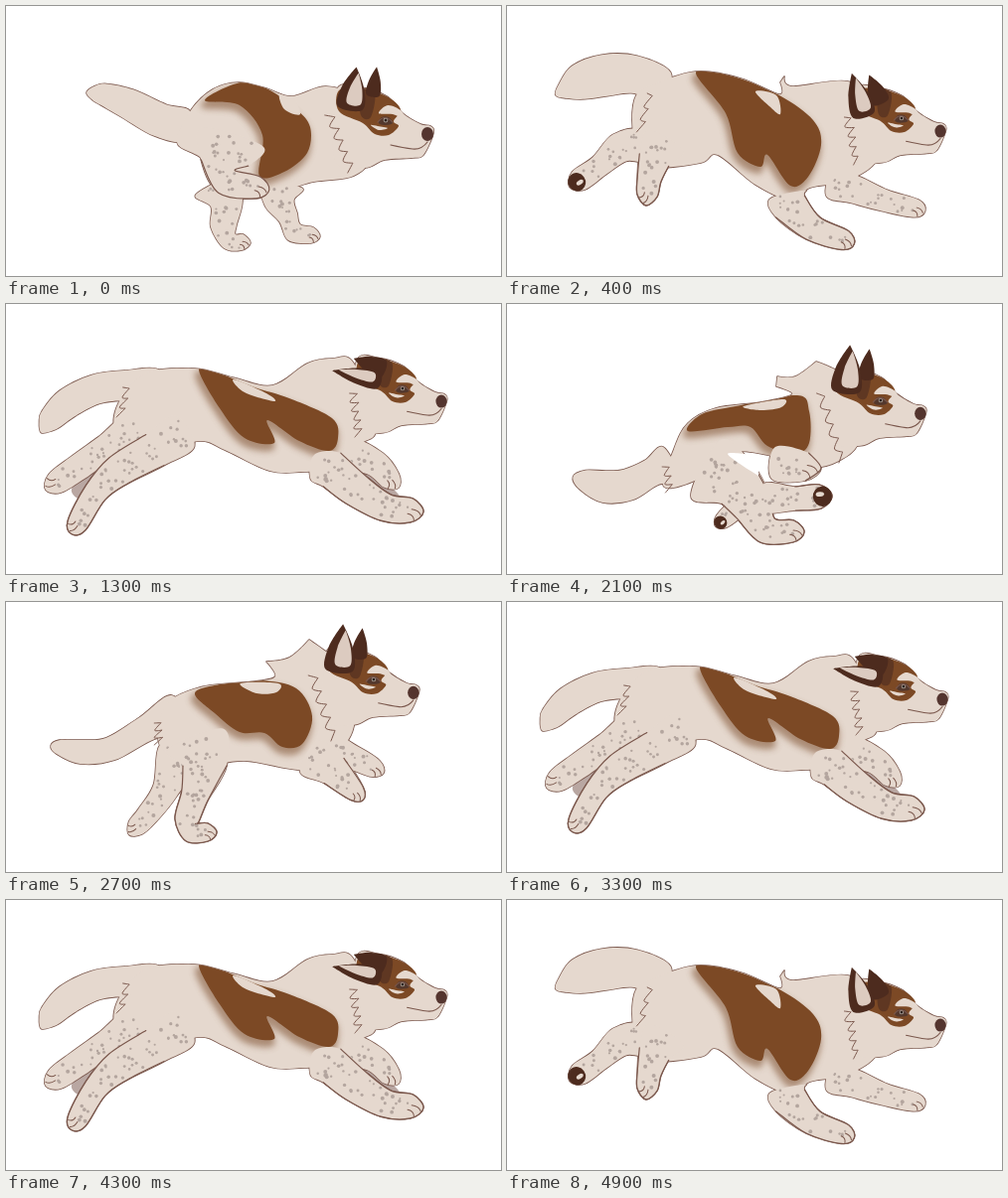
Recreate the animation shown at these times as an HTML page. Size 498 by 272 pixels, loop 5000 ms.

```html
<!DOCTYPE html>
<html lang="en">
<head>
<meta charset="utf-8">
<title>Running dog</title>
<style>
html, body { margin: 0; width: 100%; height: 100%; overflow: hidden; background: #fff; }
svg { display: block; width: 100vw; height: 100vh; }
path { stroke-linecap: round; stroke-linejoin: round; }
</style>
</head>
<body>
<svg id="stage" viewBox="0 0 498 272">
  <filter id="blur" x="-20%" y="-20%" width="140%" height="140%"><feGaussianBlur stdDeviation="3"/></filter>
</svg>
<script>
const COAT = '#e5d8ce', INK = '#7a574c', BROWN = '#7c4925', DARK = '#4d2b1e';

// "x,y x,y!" becomes a list of points; "!" makes a corner.
const parse = text => text.split(' ').map(s =>
  Object.assign(s.replace('!', '').split(',').map(Number), { sharp: s.endsWith('!') }));

// Smooth curve through all points.
function curve(pts, closed = true) {
  const n = pts.length;
  const at = i => closed ? pts[(i + n) % n] : pts[Math.max(0, Math.min(n - 1, i))];
  const handle = (i, dir) => [0, 1].map(k => at(i)[k] + (at(i).sharp ? 0 : dir * (at(i + 1)[k] - at(i - 1)[k]) / 6));
  let d = 'M' + pts[0];
  for (let i = 0; i < n - !closed; i++) d += `C${handle(i, 1)} ${handle(i + 1, -1)} ${at(i + 1).slice(0, 2)}`;
  return d + (closed ? 'Z' : '');
}

const fill = (d, color, extra = '') => `<path d="${d}" fill="${color}" ${extra}/>`;
const blob = (text, color) => text ? fill(curve(parse(text)), color) : '';
const line = (d, width = 1.2) => fill(d, 'none', `stroke="${INK}" stroke-width="${width}"`);
const place = ([x, y], angle, sx, sy, inner) =>
  `<g transform="translate(${x} ${y}) rotate(${angle}) scale(${sx} ${sy})">${inner}</g>`;

let seed = 0;
const random = () => { const v = Math.sin(++seed * 12.9898) * 43758.5453; return v - Math.floor(v); };

// A tapered limb through joints "x,y,radius"; a trailing "!" gives it a dark pad.
function limb(text) {
  const joints = parse(text), end = joints.length - 1, left = [], right = [];
  let angle;
  joints.forEach(([x, y, r], i) => {
    const a = joints[Math.max(0, i - 1)], b = joints[Math.min(end, i + 1)];
    angle = Math.atan2(b[1] - a[1], b[0] - a[0]);
    const dx = r * Math.sin(angle), dy = -r * Math.cos(angle);
    left.push([x + dx, y + dy]);
    right.unshift([x - dx, y - dy]);
  });
  const paw = joints[end], r = paw[2];
  const tip = [paw[0] + r * Math.cos(angle), paw[1] + r * Math.sin(angle)];
  return {
    joints, paw, angle: angle * 180 / Math.PI,
    outline: curve([...left, tip, ...right]),
    edge: curve([...left.slice(1), tip, ...right.slice(0, -1)], false)
  };
}

function speckles({ joints }) {
  let out = '';
  for (let i = 1; i < joints.length; i++) {
    const a = joints[i - 1], b = joints[i];
    const dx = b[0] - a[0], dy = b[1] - a[1], len = Math.hypot(dx, dy);
    for (let n = len * (a[2] + b[2]) / 100; n > 0; n--) {
      const t = random(), side = (random() - .5) * 1.5 * (a[2] + (b[2] - a[2]) * t) / len;
      out += `<circle cx="${a[0] + dx * t - dy * side}" cy="${a[1] + dy * t + dx * side}" r="${1 + random()}"/>`;
    }
  }
  return `<g fill="#b3a59e">${out}</g>`;
}

function pawMarks({ paw, angle }) {
  const r = paw[2];
  return paw.sharp
    ? place(paw, angle, r, r, `<ellipse cx=".2" rx=".8" ry=".85" fill="${DARK}"/><ellipse cx="0" cy="-.2" rx=".35" ry=".2" fill="${COAT}"/>`)
    : place(paw, angle, 1, 1, line(`M0 ${-r * .1}q${r * .6} 0 ${r * .8} ${r * .4}M${-r * .3} ${r * .3}q${r * .5} 0 ${r * .6} ${r * .5}`, 1));
}

// Ragged fur between two points.
function fur(text, n = 5) {
  const [[x1, y1], [x2, y2]] = parse(text), pts = [];
  for (let i = 0; i <= 2 * n; i++) {
    const t = i / (2 * n), out = (i % 2 ? 4 : -3) + random() * 2;
    pts.push(Object.assign([x1 + (x2 - x1) * t + out, y1 + (y2 - y1) * t + (i % 2 ? -2 : 2)], { sharp: i % 2 }));
  }
  return line(curve(pts, false), 1);
}

// The head, drawn around the eye.
const HEAD = curve(parse('-49,-30 -25,-34 2,-25 18,-8 36,3 46,5 49,12 39,34 28,37 0,39 -20,47 -50,40'));
const FACE =
  blob('-46,-31 -24,-33 2,-25 16,-12 9,0 14,5 4,14 -10,13 -22,2 -46,-10', BROWN) +
  blob('-24,-31 -10,-28 -14,-4 -24,-6', '#5f3722') +
  blob('-6,-8 3,-16 16,-11 19,-3 8,-7', COAT) +
  blob('-14,4 -7,5 3,7 -6,9', COAT) +
  blob('-6,2 -3,-4 4,-4 8,2 0,4', '#53382d') +
  '<circle r="2.4" cx="1" cy="-1" fill="#a9a098"/><circle r="1.5" cx="1" cy="-1" fill="#2e1f1a"/>' +
  line('M-7 1Q0-8 8 1M43 21Q37 29 28 28T6 24') +
  '<ellipse cx="43" cy="13" rx="6" ry="7" fill="#54352f"/>';

// Ear: base point, tilt, width, length.
const EAR = curve(parse('-.5,0 -.45,-.5 0,-1! .45,-.5 .5,0'));
const ear = ([x, y, tilt, w, h], open) => place([x, y], tilt, w, h, fill(EAR, DARK) +
  (open ? `<g transform="translate(.12 -.12) scale(.55 .75)">${fill(EAR, '#dccbc0')}</g>` : ''));

// Joints and outlines of the stride, one entry per pose.
const poses = [
  {
    eye: '381,116,1', ears: ['369,90,8,13,29', '346,103,9,25,42'],
    tail: '182,121,15 155,115,17 122,98,15 98,89,11 88,88,7',
    torso: '186,105 208,84 234,77 262,83 287,91 322,81 350,95 365,150 350,171 310,177 270,186 225,175 195,152 172,137',
    far: ['278,180,20 275,198,15 284,213,10 290,228,10 308,231,8', '213,180,24 222,200,16 219,222,13 225,237,9 238,238,8'],
    near: ['228,132,32 220,158,24 222,177,14 254,183,11'],
    saddle: '200,95 236,77 264,84 292,104 306,122 303,148 280,167 255,171 258,130 235,100',
    streak: '275,88 288,90 296,109 280,104', ruff: '323,108 346,166'
  },
  {
    eye: '375,98,.95', ears: ['361,75,7,14,30', '341,88,5,27,47'],
    tail: '165,160,18 145,170,14 122,182,16 98,184,16 76,177,10',
    torso: '168,146 182,120 210,105 255,99 287,91 271,83! 272,73! 290,73 311,58! 330,66 350,80 355,135 334,158 300,165 262,152 222,150 195,175 158,184',
    far: ['232,205,8 216,219,8!'],
    near: ['200,165,32 232,182,25 248,205,20 262,228,14 288,229,11', '258,195,14 290,196,12 315,194,12!', '268,160,16 302,164,14'],
    saddle: '182,128 196,111 230,103 292,92 304,108 304,140 290,151 262,143 245,124 222,124',
    streak: '238,103 278,96 276,104 255,107', ruff: '313,88 335,158', rump: '158,162 162,188',
    gap: '222,151 253,153! 253,173!'
  },
  {
    eye: '369,79,.95', ears: ['355,56,7,14,30', '335,69,5,27,47'],
    tail: '175,110,18 140,128,13 105,148,12 75,151,12 52,146,7',
    torso: '160,105 195,86 250,80 271,75 262,60! 285,56 305,38! 322,50 350,70 350,125 332,152 300,169 240,160 190,165 155,145',
    far: ['175,150,20 160,190,13 142,215,11 130,228,9', '320,145,14 350,157,12 372,168,9'],
    near: ['190,138,30 200,165,22 190,195,14 182,220,12 186,232,10 203,232,9', '305,155,18 330,170,16 353,193,9'],
    saddle: '190,92 215,83 255,79 292,87 308,115 298,143 278,146 260,132 235,131 210,112',
    streak: '236,82 274,82 272,91 252,92', ruff: '306,72 328,138', rump: '152,120 152,142'
  },
  {
    eye: '398,86,.93', ears: ['380,66,-70,18,32', '375,77,-78,17,48'],
    tail: '155,82,15 120,82,15 90,86,15 62,100,15 45,116,12 40,123,8',
    torso: '140,70 190,65 228,74 268,82 303,60 328,55 350,60 372,125 356,142 345,165 300,169 265,168 220,147 195,138 150,148 112,130 113,100',
    far: ['135,130,22 100,146,14 72,165,13 49,181,11', '345,150,14 372,161,13 388,178,10'],
    near: ['180,128,18 150,147,18 113,168,16 90,190,12 71,223,10', '308,164,12 328,167,19 352,187,17 382,205,14 408,208,12'],
    saddle: '194,66 215,70 250,84 285,95 328,115 334,135 325,148 295,138 263,117 270,140 240,135 215,105',
    streak: '229,76 262,90 270,98 240,89', ruff: '347,88 354,132', rump: '120,82 114,112',
    shade: ['92,158 66,186 80,196', '362,165 395,192 388,200 365,185']
  },
  {
    eye: '396,114,.93', ears: ['376,97,-23,17,30', '359,110,-16,22,44'],
    tail: '160,80,14 128,69,19 98,70,21 72,77,18 56,86,8',
    torso: '145,80 190,66 235,73 274,89 275,77! 279,71! 287,81 343,76 370,100 375,150 345,175 305,183 285,195 250,180 212,150 195,158 150,162 131,145 126,115 130,90',
    far: ['135,140,15 113,143,15 93,161,11 72,176,11!', '325,178,14 350,185,14 380,196,11 412,204,9'],
    near: ['160,135,20 148,155,16 143,175,12 141,191,10', '282,190,18 285,202,18 308,224,13 340,236,10'],
    saddle: '190,67 225,70 274,90 308,115 316,140 303,172 285,181 262,150 255,162 232,148 220,108',
    streak: '250,86 271,90 275,109 264,101', ruff: '341,110 350,158', rump: '143,86 133,125'
  }
];

function draw(p, i) {
  const tail = limb(p.tail), far = p.far.map(limb), near = p.near.map(limb);
  const torso = curve(parse(p.torso)), saddle = curve(parse(p.saddle));
  const [ex, ey, size] = parse(p.eye)[0];
  const head = inner => place([ex, ey], 0, size, size, inner);
  const back = [tail, ...far].map(l => l.outline).concat(torso);
  const legs = list => list.map(l => speckles(l) + pawMarks(l)).join('');
  const rim = `stroke="${INK}" stroke-width="1.6"`;
  return `<g class="pose"><clipPath id="torso${i}">${fill(torso, '#000')}</clipPath>` +
    (p.shade || []).map(s => blob(s, '#b9a7a2')).join('') +
    [...back, ...near.map(l => l.outline)].map(d => fill(d, COAT, rim)).join('') + head(fill(HEAD, COAT, rim)) +
    back.map(d => fill(d, COAT)).join('') + legs(far) +
    `<g clip-path="url(#torso${i})">` +
    fill(saddle, '#9c785e', 'stroke="#9c785e" stroke-width="4" transform="translate(-2 5)" filter="url(#blur)" opacity=".8"') +
    fill(saddle, BROWN) + blob(p.streak, COAT) + '</g>' +
    near.map(l => fill(l.outline, COAT) + line(l.edge)).join('') + legs(near) + blob(p.gap, '#fff') +
    head(fill(HEAD, COAT) + FACE) + fur(p.ruff) + (p.rump ? fur(p.rump, 3) : '') +
    p.ears.map((e, k) => ear(parse(e)[0], k)).join('') + '</g>';
}

const stage = document.getElementById('stage');
stage.insertAdjacentHTML('beforeend', poses.map(draw).join(''));
const groups = stage.querySelectorAll('.pose');

function tick() {
  const now = Math.floor(performance.now() / 100) % poses.length;
  groups.forEach((g, i) => g.style.display = i === now ? '' : 'none');
  requestAnimationFrame(tick);
}
tick();
</script>
</body>
</html>
```
